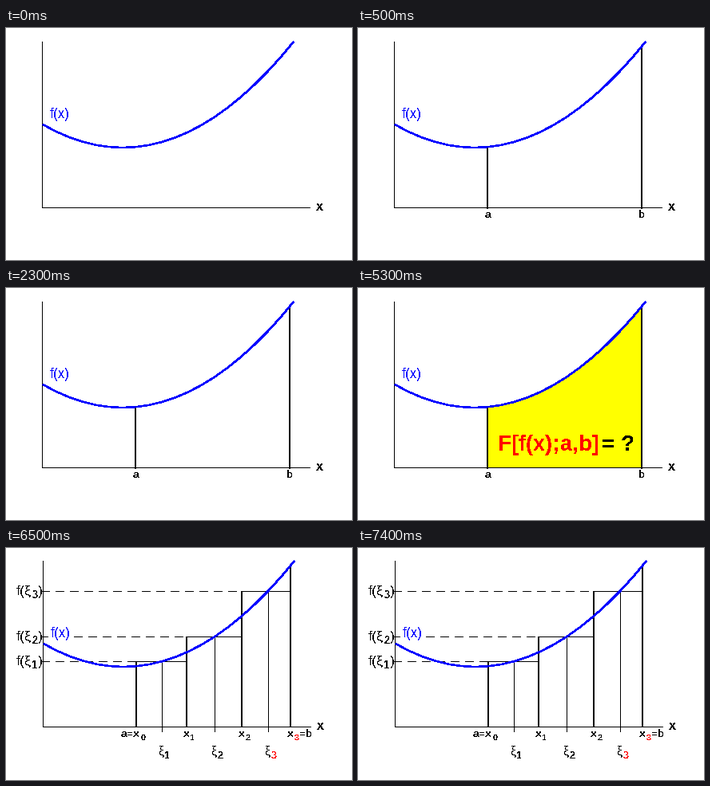
Recreate the animation shown at these times as a matplotlib script. Size 433 by 291 pixels, loop 8000 ms.

```python
import numpy as np
import matplotlib.pyplot as plt
from matplotlib.animation import FuncAnimation

W, H, DPI = 433, 291, 64
PT = 72 / DPI  # points per pixel
STEP = 500
BLUE, RED, YELLOW = "#0000ff", "#ff0000", "#ffff00"

plt.rcParams.update({
    "font.family": "Liberation Sans",
    "text.antialiased": False,
    "text.hinting": "native",
    "text.hinting_factor": 1,
    "lines.antialiased": False,
    "lines.solid_capstyle": "butt",
})

fig = plt.figure(figsize=(W / DPI, H / DPI), dpi=DPI, facecolor="white")
ax = fig.add_axes([0, 0, 1, 1])
ax.set_xlim(0, W)
ax.set_ylim(H, 0)
ax.axis("off")


def curve(x):
    return 150 - 0.0029 * (x - 146) ** 2


def line(x, y, width=1, color="black", **style):
    return ax.plot(x, y, lw=width * PT, color=color, **style)


def label(x, y, text, size, color="black", bold=False, ha="left"):
    return [ax.text(x, y, text, fontsize=size * PT, color=color, ha=ha,
                    va="baseline", weight="bold" if bold else "normal",
                    zorder=5)]


def runs(x, y, parts, size, bold=False):
    """Set runs side by side; each part is (text, is_subscript, colour)."""
    made = []
    for text, sub, color in parts:
        made += label(x, y + (4 if sub else 0), text,
                      size * 0.75 if sub else size, color, bold or sub)
        x += made[-1].get_window_extent().width + 0.5
    return made


def indexed(before, index, after="", color="black"):
    return [(before, False, "black"), (index, True, color)] + (
        [(after, False, "black")] if after else [])


def graph(dx=0, dy=0):
    x = np.linspace(46, 360, 20)
    return (line([45 + dx] * 2, [17 + dy, 225 + dy])
            + line([45 + dx, 380 + dx], [225 + dy] * 2)
            + line(x + dx, curve(x) + dy, 1.5, BLUE, zorder=4)
            + label(55 + dx, 113 + dy, "f(x)", 18, BLUE)
            + label(388 + dx, 229 + dy, "x", 17, bold=True))


def limits():
    made = []
    for x, name in ((162, "a"), (355, "b")):
        made += line([x] * 2, [curve(x), 227], 2, zorder=3)
        made += label(x + 0.5, 238, name, 13, bold=True, ha="center")
    return made


def area():
    x = np.linspace(162, 355, 60)
    fill = ax.fill_between(x, curve(x), 225, color=YELLOW, lw=0,
                           antialiased=False, zorder=1)
    return ([fill] + label(175, 204, "F[f(x);a,b]", 27, RED, True)
            + label(305, 204, "= ?", 27, bold=True))


def bars():
    edges, mids, tops = (163, 226, 295, 356), (195, 261, 328), (142, 111, 54)
    base = 224
    made = graph(1, -1)
    for i, (mid, top) in enumerate(zip(mids, tops)):
        left, right = edges[i], edges[i + 1]
        made += line([left] * 2, [top, base], 2)
        made += line([left - 1, right], [top] * 2)
        made += line([mid] * 2, [top, base + 6])
        start = 85 if i == 1 else 44
        made += line([start, left], [top] * 2, dashes=(10, 7))
        made += runs(13, top + 5, indexed("f(ξ", str(i + 1), ")"), 17)
        made += runs(mid - 4, 260, indexed(
            "ξ", str(i + 1), color=RED if i == 2 else "black"), 16)
    made += line([44, 52], [tops[1]] * 2)
    made += line([edges[-1]] * 2, [23, base], 2)
    names = ((144, indexed("a=x", "0")), (222, indexed("x", "1")),
             (291, indexed("x", "2")), (352, indexed("x", "3", "=b", RED)))
    for x, parts in names:
        made += runs(x, 237, parts, 13, True)
    return made


# Each group of artists with the span of time (ms) it is on screen.
groups = [
    (graph(), 0, 6500),
    (limits(), 500, 6500),
    (area(), 3500, 6500),
    (bars(), 6500, 8000),
]


def draw(frame):
    t = frame * STEP
    for artists, start, end in groups:
        for artist in artists:
            artist.set_visible(start <= t < end)
    return []


anim = FuncAnimation(fig, draw, frames=16, interval=STEP, repeat=True,
                     repeat_delay=0, blit=False)
plt.show()
```
